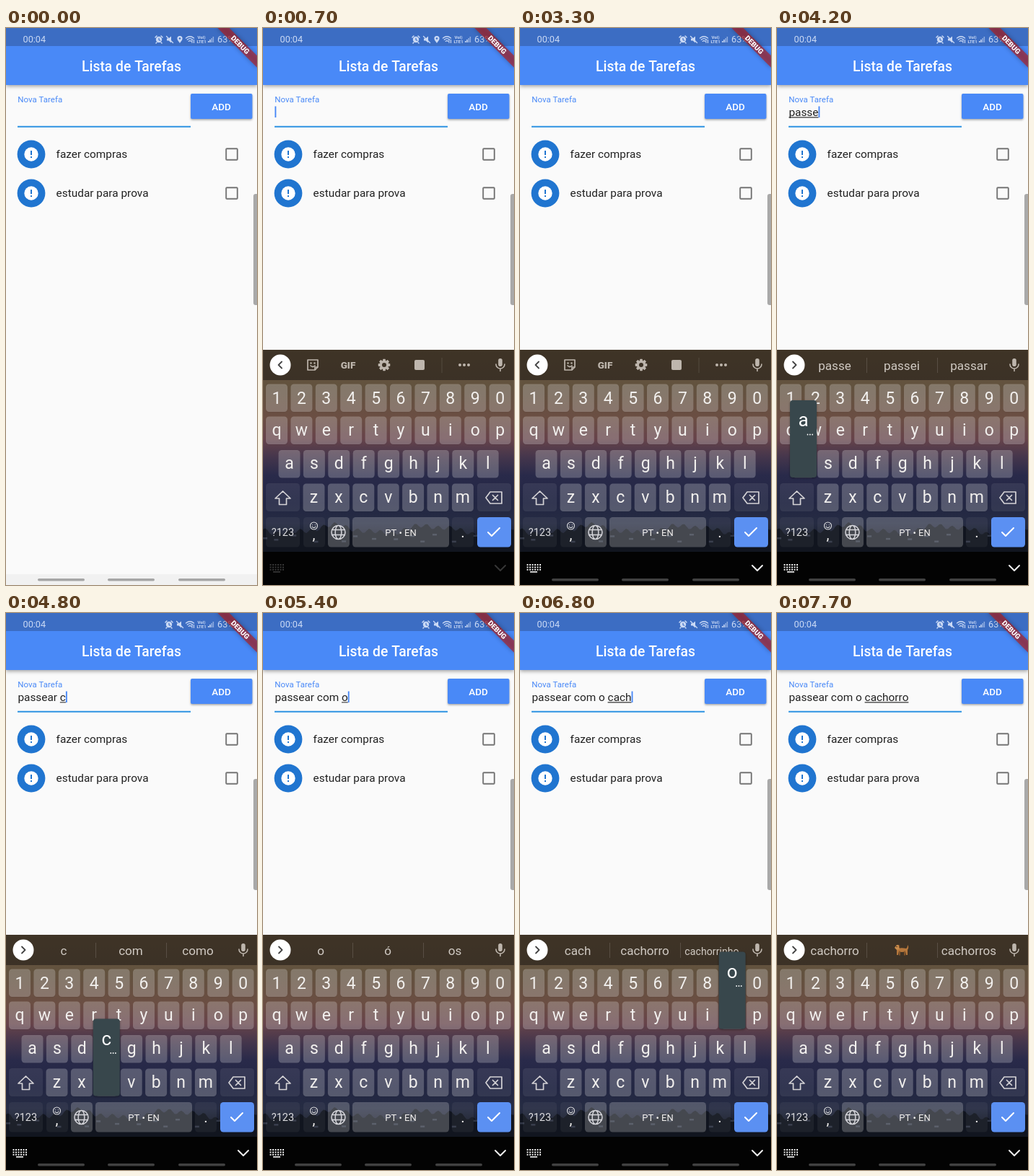
Recreate the animation shown at these times as an HTML page with a canvas. Size 348 px wide and 772 px high, loop 8 s.

```html
<!DOCTYPE html>
<html lang="pt">
<head>
<meta charset="utf-8">
<title>Lista de Tarefas</title>
<style>
html, body { margin: 0; width: 100%; height: 100%; overflow: hidden; background: #fafafa; }
canvas { display: block; width: 348px; height: 772px; }
</style>
</head>
<body>
<canvas id="stage"></canvas>
<script>
const W = 348, H = 772, LOOP = 8000;
const BLUE = '#4989f7', PALE = '#cbdaf5', ICON = '#beb6ad', KEY_TEXT = '#f2f0ee';
const canvas = document.getElementById('stage');
const ctx = canvas.getContext('2d');
const dpr = window.devicePixelRatio || 1;
canvas.width = W * dpr;
canvas.height = H * dpr;

const PHRASE = 'passear com o cachorro';
const TIMES = [3480, 3640, 3800, 3940, 4100, 4270, 4420, 4600, 4800, 4920, 5040,
  5200, 5360, 5900, 6150, 6350, 6550, 6720, 6880, 7000, 7100, 7190];
const HINTS = ['p para por', 'pa para pai', 'pas passar passo', 'pass passar passa',
  'passe passei passar', 'passea passear passeando', 'passear passeio passeando', 'no com na',
  'c com como', 'co com como', 'com como comigo', 'a o os', 'o ó os', 'meu cachorro pessoal',
  'c cachorro com', 'ca cachorro casa', 'cac cachorro cachorra', 'cach cachorro cachorrinho',
  'cacho cachorro cachorrinho', 'cachor cachorro cachorrinho', 'cachorr cachorro cachorrinho',
  'cachorro @dog cachorros'].map(s => s.split(' '));
const ROWS = [
  { keys: '1234567890', x: 19, y: 512.5 },
  { keys: 'qwertyuiop', x: 19, y: 557.5 },
  { keys: 'asdfghjkl', x: 36.5, y: 604 },
  { keys: 'zxcvbnm', x: 70.5, y: 650.5 }
];
const PITCH = 34.4;

const clamp = v => Math.max(0, Math.min(1, v));
const easeOut = v => 1 - Math.pow(1 - clamp(v), 3);

function box(x, y, w, h, color, r = 0) {
  ctx.fillStyle = color;
  ctx.beginPath();
  ctx.roundRect(x, y, w, h, r);
  ctx.fill();
}
function disc(x, y, r, color) {
  ctx.fillStyle = color;
  ctx.beginPath();
  ctx.arc(x, y, r, 0, 7);
  ctx.fill();
}
function text(s, x, y, size, color, { align = 'left', weight = 400 } = {}) {
  ctx.font = `${weight} ${size}px Roboto, sans-serif`;
  ctx.textAlign = align;
  ctx.fillStyle = color;
  ctx.fillText(s, x, y);
}
const label = (s, x, y, size, color, weight) => text(s, x, y, size, color, { align: 'center', weight });

// Path centred on (x, y): stroked when a line width is given, else filled.
function glyph(d, x, y, color, width) {
  ctx.save();
  ctx.translate(x, y);
  ctx.lineCap = ctx.lineJoin = 'round';
  ctx.fillStyle = ctx.strokeStyle = color;
  ctx.lineWidth = width || 1;
  const path = new Path2D(d);
  width ? ctx.stroke(path) : ctx.fill(path);
  ctx.restore();
}
function shadowed(color, blur, dy, draw) {
  ctx.save();
  ctx.shadowColor = color;
  ctx.shadowBlur = blur * dpr;
  ctx.shadowOffsetY = dy * dpr;
  draw();
  ctx.restore();
}

function statusBar(t) {
  const pin = t < 1150, shift = pin ? 0 : 14;
  box(0, 0, W, 25, '#3c6dc3');
  text('00:04', 23.5, 20.3, 12.7, PALE);

  disc(212 + shift, 16, 4.2, PALE);
  glyph('M-5 -3L-3 -5M5 -3L3 -5M-3 4L-4 5M3 4L4 5', 212 + shift, 16, PALE, 1.5);
  glyph('M0 -2V.5L1.8 1.2', 212 + shift, 16, '#3c6dc3', 1.1);
  glyph('M-4 -1.5H-1.5L2 -4.5V4.5L-1.5 1.5H-4Z', 227 + shift, 16, PALE);
  glyph('M-4.5 -4.5L4.5 4.5', 227 + shift, 16, PALE, 1.3);
  if (pin) {
    glyph('M0 5C-2 2 -3.6 .5 -3.6 -1.5A3.6 3.6 0 0 1 3.6 -1.5C3.6 .5 2 2 0 5Z', 241, 16, PALE);
    disc(241, 14.5, 1.3, '#3c6dc3');
  }
  glyph('M-5.5 -2Q0 -6.5 5.5 -2M-3.7 .2Q0 -2.8 3.7 .2M-1.8 2.4Q0 1 1.8 2.4', 255, 16, PALE, 1.3);
  glyph('M3 1V5M5.5 1V5', 255, 15.5, PALE, 1.1);
  label('VoI)', 271, 14.5, 6, PALE, 700);
  label('LTE1', 271, 20.5, 6, PALE, 700);
  for (let i = 0; i < 4; i++) {
    ctx.globalAlpha = i < 2 ? 1 : 0.6;
    box(280 + i * 2.2, 18 - i * 2, 1.5, 2 + i * 2, PALE);
  }
  ctx.globalAlpha = 1;
  text('63%', 293, 20.3, 12.7, PALE);
}

function debugBanner() {
  ctx.save();
  ctx.translate(W, 0);
  ctx.rotate(Math.PI / 4);
  ctx.scale(0.967, 0.967);
  shadowed('rgba(0,0,0,.45)', 6, 0, () => box(-40, 28, 80, 12, 'rgba(183,28,28,.63)'));
  label('DEBUG', 0, 37.6, 10.2, '#fff', 900);
  ctx.restore();
}

function task(name, y) {
  disc(35, y, 19.4, '#2075d0');
  disc(35, y, 9.7, '#fff');
  box(34, y - 5, 2, 6, '#2075d0');
  box(34, y + 3, 2, 2, '#2075d0');
  text(name, 69.6, y + 5.3, 15.4, '#212121');
  ctx.strokeStyle = '#757575';
  ctx.lineWidth = 1.9;
  ctx.beginPath();
  ctx.roundRect(305.2, y - 7.8, 15.6, 15.6, 1);
  ctx.stroke();
}

function caretOn(t, typed) {
  if (typed) return (t - TIMES[typed - 1]) % 1000 < 500;
  return t > 570 && (t - 570) % 970 < 485;
}

function inputField(t, typed) {
  text('Nova Tarefa', 16.3, 102.6, 11.5, BLUE);
  box(16, 135.8, 240, 1.9, '#2c92e2');
  const value = PHRASE.slice(0, typed);
  text(value, 16.4, 122, 15.4, '#212121');
  const end = 16.4 + ctx.measureText(value).width;
  const start = 16.4 + ctx.measureText(value.slice(0, value.lastIndexOf(' ') + 1)).width;
  if (end > start) box(start, 123.3, end - start, 1.1, '#333');
  if (caretOn(t, typed)) box(end, 108.5, 1.9, 15.5, BLUE);
}

function app(t, typed) {
  box(0, 0, W, H, '#fafafa');
  shadowed('rgba(0,0,0,.35)', 5, 2, () => box(0, 0, W, 79, BLUE));
  statusBar(t);
  label('Lista de Tarefas', 174, 59.7, 19.3, '#fff', 500);
  inputField(t, typed);
  shadowed('rgba(0,0,0,.35)', 3, 1.5, () => box(256, 91, 85.5, 35, BLUE, 2));
  label('ADD', 298.5, 113.6, 13.5, '#fff', 500);
  task('fazer compras', 175);
  task('estudar para prova', 229);
  debugBanner();
  box(343, 230, 8, 154, '#a9a9a9', 3);
  box(0, 757, W, 15, '#f1f1f1');
  navBars('#a6a6a6');
}

function navBars(color) {
  for (const x of [44, 141, 239]) box(x, 763, 65, 3.4, color, 1.7);
}

function scenery() {
  const sky = ctx.createLinearGradient(0, 446, 0, 726);
  const stops = [[0, '#6a583f'], [.18, '#62523e'], [.34, '#6b4e43'], [.44, '#67434a'], [.53, '#45364c'],
    [.62, '#292a4a'], [.76, '#222643'], [.86, '#262c43'], [1, '#10131c']];
  stops.forEach(([at, color]) => sky.addColorStop(at, color));
  ctx.fillStyle = sky;
  ctx.fillRect(0, 446, W, 280);
  // Treeline with a few pale houses
  ctx.fillStyle = '#11151f';
  ctx.beginPath();
  ctx.moveTo(0, 726);
  for (let x = 0; x <= W; x += 3)
    ctx.lineTo(x, 695 + 5 * Math.sin(x / 21) + 3 * Math.sin(x * 1.7) + 2 * Math.sin(x * 4.3));
  ctx.lineTo(W, 726);
  ctx.fill();
  for (let i = 0; i < 16; i++)
    box(i * 22 + 7 * Math.sin(i * 5), 706 + 5 * Math.sin(i * 9), 6, 2.5, 'rgba(120,130,155,.3)');
}

function dog(x, y) {
  const fur = '#b5773c';
  glyph('M-6 -2Q0 -3.5 6 -2Q8 -3 8 -7Q10.5 -4 8 0L8 7H6L5 2Q0 4 -4 2L-5 7H-7L-7 0Z', x, y, fur);
  glyph('M-10 -3L-7 -7L-4 -7L-3 -1L-7 0Z', x, y, '#c98b4b');
  glyph('M-4.5 -7L-2.5 -6L-3 -2Z', x, y, '#784820');
  glyph('M-3 2L-3 7M4 2L4 7', x, y, '#915c2b', 1.6);
  disc(x - 7, y - 4.5, .7, '#2b1b10');
}

function microphone(x, y) {
  box(x - 2.8, y - 9, 5.6, 11, ICON, 2.8);
  glyph('M-6 -1A6 6 0 0 0 6 -1M0 5V8.5', x, y, ICON, 1.6);
}

function toolbar() {
  glyph('M-7 -7H7V3L3 7H-7ZM7 3H3V7M-3 1Q0 4 3 1', 69, 467, ICON, 1.7);
  disc(66.5, 464.5, 1.2, ICON);
  disc(71.5, 464.5, 1.2, ICON);
  label('GIF', 118, 471.6, 13.5, ICON, 900);
  for (let i = 0; i < 8; i++) {
    ctx.save();
    ctx.translate(168, 467);
    ctx.rotate(i * Math.PI / 4);
    box(-1.9, -8.3, 3.8, 4, ICON, .8);
    ctx.restore();
  }
  ctx.strokeStyle = ICON;
  ctx.lineWidth = 3.2;
  ctx.beginPath();
  ctx.arc(168, 467, 4.6, 0, 7);
  ctx.stroke();
  box(210, 460, 14, 14, ICON, 2);
  box(247.5, 457, 1, 21, 'rgba(255,255,255,.12)');
  for (const x of [273, 279, 285]) disc(x, 467, 2, ICON);
}

function suggestions(words) {
  for (const x of [124, 222]) box(x, 457, 1, 21, 'rgba(255,255,255,.14)');
  words.forEach((word, i) => {
    const x = 80 + i * 93;
    if (word === '@dog') return dog(x, 467);
    label(word, x, 473.6, word.length > 9 ? 14.2 : 17.1, '#d0cac3');
  });
}

function strip(typed) {
  box(0, 446, W, 42, 'rgba(20,16,14,.5)');
  disc(24, 467, 14.5, '#fff');
  glyph(typed ? 'M-2 -4.5L2.5 0L-2 4.5' : 'M2 -4.5L-2.5 0L2 4.5', 24, 467, '#444', 1.8);
  typed ? suggestions(HINTS[typed - 1]) : toolbar();
  microphone(329, 467);
}

function cap(x, y, w, h, alpha = .24) {
  shadowed('rgba(0,0,0,.2)', 1, 1, () => box(x, y, w, h, `rgba(255,255,255,${alpha})`, 4.5));
}

function keys(spacePressed) {
  for (const { keys, x, y } of ROWS) {
    [...keys].forEach((k, i) => {
      const cx = x + i * PITCH;
      cap(cx - 15, y - 19, 30, 38.5);
      label(k, cx, y + (keys[0] === '1' ? 8.5 : 7), 23, KEY_TEXT);
    });
  }
  cap(4, 631, 47, 39, .08);
  cap(297, 631, 47, 39, .08);
  glyph('M0 -10L10.5 0H5V8.5H-5V0H-10.5Z', 27.5, 652, '#d5d3d6', 1.7);
  glyph('M-11 0L-5 -8H11V8H-5ZM-1.5 -3.5L5.5 3.5M5.5 -3.5L-1.5 3.5', 320, 651, '#d5d3d6', 1.7);

  cap(4, 678, 47, 41.5, .05);
  cap(56, 678, 30, 41.5, .05);
  cap(90, 678, 30, 41.5, .22);
  cap(124, 678, 134, 41.5, spacePressed ? .34 : .22);
  cap(262, 678, 30, 41.5, .05);
  box(297, 678, 47, 41.5, '#5b90f2', 4.5);
  label('?123', 27.5, 704.3, 14.5, '#dddde0');
  glyph('M5 0A5 5 0 1 1 -5 0A5 5 0 1 1 5 0M-2.5 1.2Q0 4 2.5 1.2M-1.8 -1.5V-1.2M1.8 -1.5V-1.2', 70.5, 690, '#dddde0', 1.1);
  label(',', 70.5, 709, 20, KEY_TEXT);
  glyph('M9.5 0A9.5 9.5 0 1 1 -9.5 0A9.5 9.5 0 1 1 9.5 0M4.3 0A4.3 9.5 0 1 1 -4.3 0A4.3 9.5 0 1 1 4.3 0M-8.5 -3.5H8.5M-8.5 3.5H8.5',
    104.5, 699, '#d5d5da', 1.5);
  label('PT • EN', 191, 703.5, 13, KEY_TEXT);
  label('.', 277, 706, 21, KEY_TEXT);
  glyph('M-8 0L-3 5L8 -6', 320, 699, '#fff', 2);
}

function popup(k) {
  const row = ROWS.find(r => r.keys.includes(k));
  const x = Math.min(row.x + row.keys.indexOf(k) * PITCH, 317.5);
  shadowed('rgba(0,0,0,.4)', 3, 1, () => box(x - 18.5, row.y - 88, 37, 107, '#38474c', 4));
  label(k, x, row.y - 52, 26, '#fff');
  for (let i = -1; i < 2; i++) disc(x + 9.3 + i * 3.3, row.y - 40.5, .9, '#fff');
}

function keyboard(t, typed) {
  const rise = easeOut((t - 470) / 210);
  if (!rise) return;
  const next = TIMES.findIndex(at => t >= at - 110 && t < at + 10);
  const pressed = next < 0 ? '' : PHRASE[next];
  const lit = clamp((t - 720) / 400);
  ctx.save();
  ctx.translate(0, (1 - rise) * 326);
  scenery();
  box(0, 726, W, 46, '#030303');
  strip(typed);
  keys(pressed === ' ');
  if (pressed && pressed !== ' ') popup(pressed);

  ctx.globalAlpha = .22 + .78 * lit;
  for (let r = 0; r < 3; r++)
    for (let c = 0; c < 6; c++) box(9.5 + c * 3.5, 743 + r * 3.4, 2, 2, '#eee');
  box(14, 753, 10, 1.7, '#eee');
  glyph('M-7 -3.5L0 3.5L7 -3.5', 329, 748.5, '#eee', 2);
  ctx.globalAlpha = lit;
  navBars('#414141');
  ctx.restore();
}

function draw(t) {
  const typed = TIMES.filter(at => t >= at).length;
  ctx.setTransform(dpr, 0, 0, dpr, 0, 0);
  app(t, typed);
  keyboard(t, typed);
}

const begin = performance.now();
function tick() {
  draw((performance.now() - begin) % LOOP);
  requestAnimationFrame(tick);
}
tick();
</script>
</body>
</html>
```
